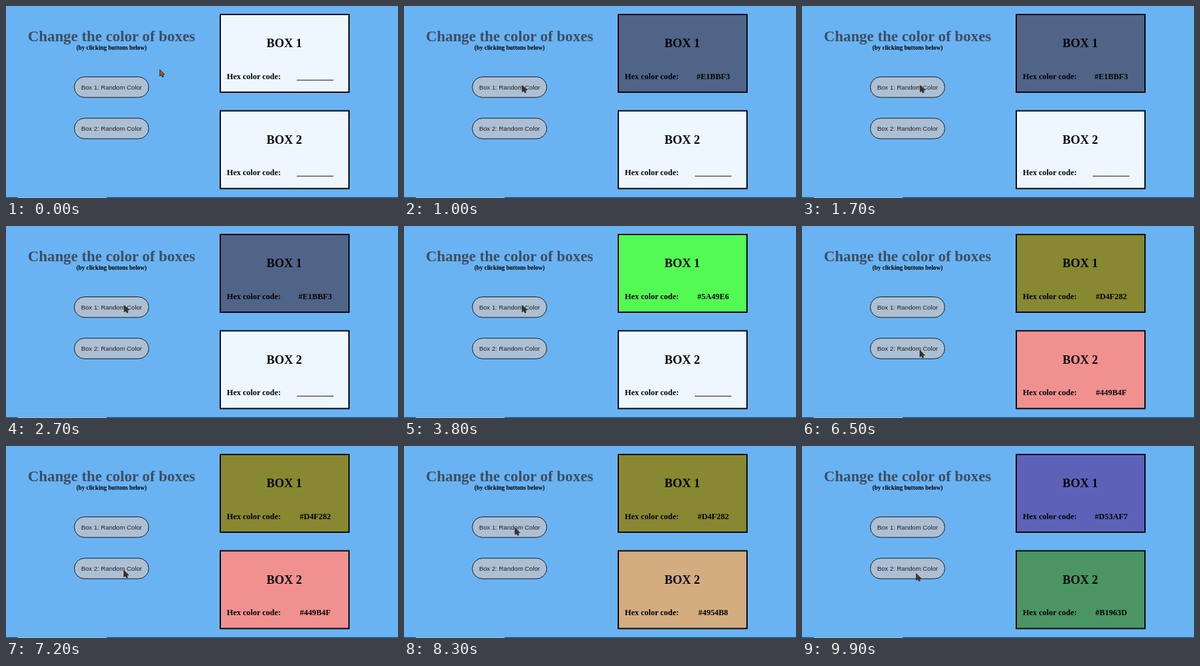
An HTML page for the animation above (10000 ms loop, 600 by 294 pixels).

```html
<!DOCTYPE html>
<html lang="en">
<head>
<meta charset="utf-8">
<title>Change the color of boxes</title>
<style>
html, body { margin: 0; width: 100%; height: 100%; overflow: hidden; background: #6ab3f3; }
svg { display: block; width: 600px; height: 294px; }
text { font: bold 12.44px "Liberation Serif", "Times New Roman", serif; }
.mid { text-anchor: middle; }
.title { font-size: 23.33px; fill: #3d4d60; }
.note { font-size: 9.33px; }
.name { font-size: 18.67px; }
.label { font: 9.75px "Liberation Sans", Arial, sans-serif; fill: #1c1f24; }
.button { fill: #adbfd2; stroke: #16191d; }
.box { fill: #eef7ff; stroke: #05070a; stroke-width: 2; }
.pointer { stroke: #25211d; stroke-width: 1; stroke-linejoin: round; }
</style>
</head>
<body>
<svg viewBox="0 0 600 294">
  <rect width="600" height="294" fill="#6ab3f3"/>
  <text class="mid title" x="161.5" y="53.5">Change the color of boxes</text>
  <text class="mid note" x="161.5" y="67">(by clicking buttons below)</text>

  <rect class="button" x="104.5" y="108.5" width="114" height="31.5" rx="15.75"/>
  <text class="mid label" x="161.5" y="127.7">Box 1: Random Color</text>
  <rect class="button" x="104.5" y="171.8" width="114" height="31.5" rx="15.75"/>
  <text class="mid label" x="161.5" y="191">Box 2: Random Color</text>

  <g>
    <rect class="box" x="328" y="13" width="197" height="119"/>
    <text class="mid name" x="426" y="63">BOX 1</text>
    <text x="338" y="111.5">Hex color code:</text>
    <text class="mid code" x="473.3" y="111.5">_________</text>
  </g>
  <g transform="translate(0 147.5)">
    <rect class="box" x="328" y="13" width="197" height="119"/>
    <text class="mid name" x="426" y="63">BOX 2</text>
    <text x="338" y="111.5">Hex color code:</text>
    <text class="mid code" x="473.3" y="111.5">_________</text>
  </g>

  <rect y="292.8" width="600" height="1.2" fill="#1d4a70"/>
  <rect x="18" y="292.8" width="136" height="1.2" fill="#a8cbe6"/>
  <path class="pointer" d="M0.5 0.5V10.6L2.9 8.4L4.6 12L6.2 11.2L4.6 7.8H7.7Z"/>
</svg>
<script>
const LOOP = 10000, STEP = 100;
const BLANK = "_________";

// Each click: time, fill, displayed code
const clicks = [
  [
    [0, "#eef7ff", BLANK],
    [1000, "#506488", "#E1BBF3"],
    [2800, "#53fa54", "#5A49E6"],
    [4000, "#878831", "#D4F282"],
    [8500, "#5d62b8", "#D53AF7"]
  ],
  [
    [0, "#eef7ff", BLANK],
    [5200, "#2eebd5", "#D30B39"],
    [6200, "#f0918f", "#449B4F"],
    [7300, "#d3ac80", "#4954B8"],
    [9400, "#4b9563", "#B1963D"]
  ]
];

// Pointer stops: time, x, y
const stops = [
  [0, 235, 97], [100, 235, 97], [700, 180.5, 121], [4300, 180.5, 121],
  [4900, 180, 190], [7600, 180, 190], [8200, 169.5, 125], [8700, 169.5, 125],
  [9200, 174.5, 195], [LOOP, 174.5, 195]
];
const tints = [[0, "#b5542d"], [300, "#3b362b"], [9000, "#503c36"]];

const fills = document.querySelectorAll(".box");
const codes = document.querySelectorAll(".code");
const pointer = document.querySelector(".pointer");

const latest = (list, t) => list.filter(([time]) => time <= t).pop();
const ease = p => p * p * (3 - 2 * p);

function pointerAt(t) {
  const next = stops.findIndex(([time]) => time > t);
  const [t0, x0, y0] = stops[next - 1];
  const [t1, x1, y1] = stops[next];
  const p = ease((t - t0) / (t1 - t0));
  return [x0 + (x1 - x0) * p, y0 + (y1 - y0) * p];
}

function draw(t) {
  clicks.forEach((list, i) => {
    const [, fill, code] = latest(list, t);
    fills[i].style.fill = fill;
    if (codes[i].textContent !== code) codes[i].textContent = code;
  });
  pointer.setAttribute("transform", `translate(${pointerAt(t)})`);
  pointer.style.fill = latest(tints, t)[1];
}

const start = performance.now();
function tick() {
  const t = (performance.now() - start) % LOOP;
  draw(Math.floor(t / STEP) * STEP);
  requestAnimationFrame(tick);
}
tick();
</script>
</body>
</html>
```
